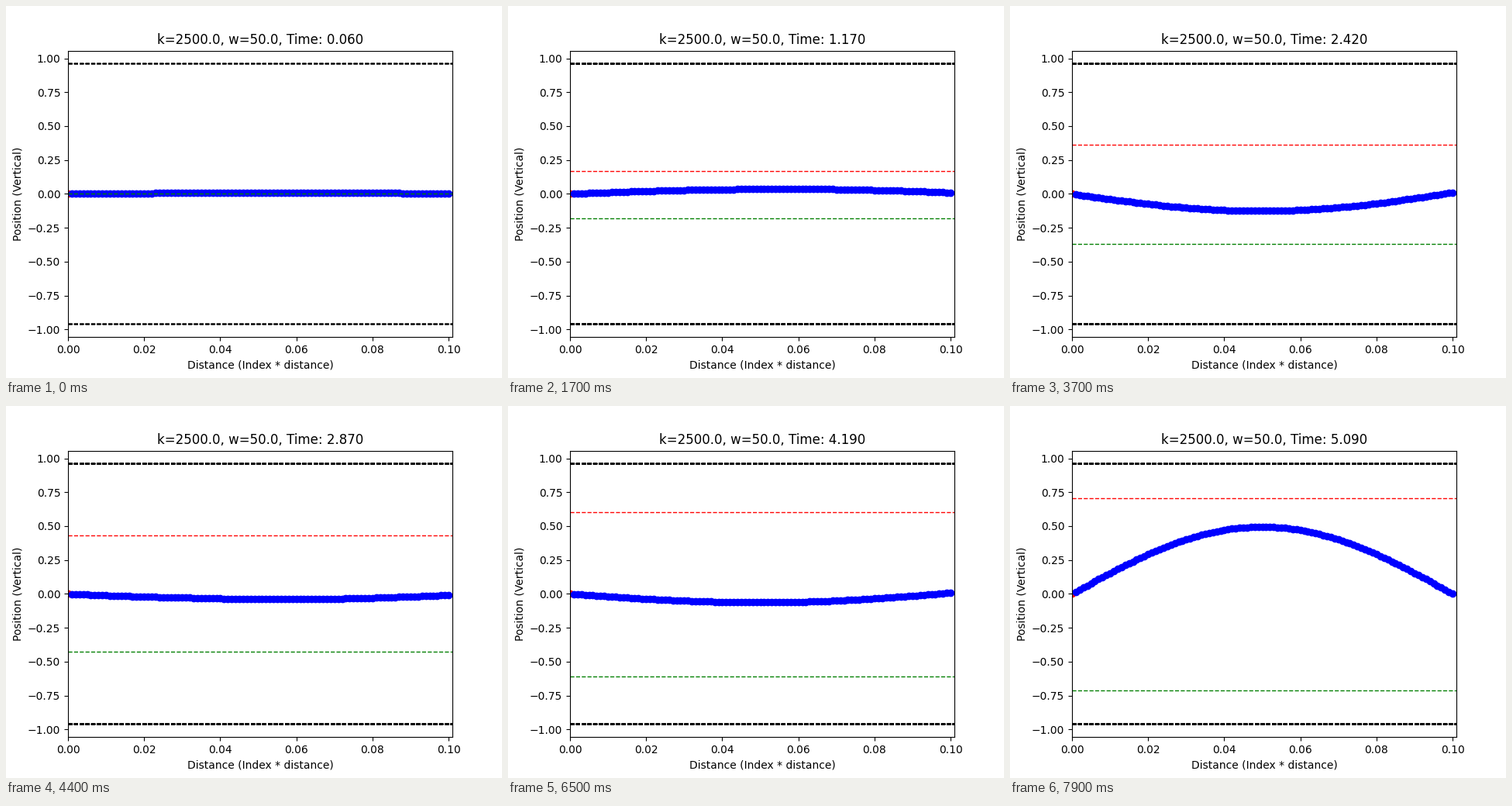
These frames come from a looping animation (640 by 480 pixels, 8 s). A matplotlib script:

```python
import numpy as np
import matplotlib.pyplot as plt
from matplotlib.animation import FuncAnimation

FRAMES, INTERVAL = 80, 100

# Chain of masses on springs, fixed at the left, driven at the right.
N, GAP = 100, 0.001
K, MASS = 2500.0, 0.001
W, DRIVE = 50.0, 0.01
PEAK = 0.961
STACK = 24

j = np.arange(N + 1)
p = np.arange(1, N)
omega2 = K / MASS
wp = 2 * np.sqrt(omega2) * np.sin(p * np.pi / (2 * N))
gain = 2 / N * omega2 * DRIVE * np.sin((N - 1) * p * np.pi / N) / (wp**2 - W**2)
shapes = np.sin(np.outer(p, j) * np.pi / N)


def chain(t):
    """Heights of all masses at each time in t, starting from rest."""
    t = np.atleast_1d(t)[:, None]
    y = (gain * (np.sin(W * t) - W / wp * np.sin(wp * t))) @ shapes
    y[:, 0] = 0
    y[:, -1] = DRIVE * np.sin(W * t[:, 0])
    return y


# Clock of the simulation, in hundredths of a second, for each frame.
steps = np.rint(np.interp(np.arange(FRAMES),
                          [0, 17, 29, 44, 53, 65, 79],
                          [6, 117, 191, 287, 345, 419, 509])).astype(int)
heights = chain(steps / 100)

fine = chain(np.arange(steps[-1] * 10 + 1) / 1000)
highest = np.maximum.accumulate(fine.max(axis=1))
lowest = np.minimum.accumulate(fine.min(axis=1))

fig, ax = plt.subplots(figsize=(6.4, 4.8), dpi=100)
ax.set_xlim(0, (N + 1) * GAP)
ax.set_ylim(-1.1 * PEAK, 1.1 * PEAK)
ax.set_xlabel("Distance (Index * distance)")
ax.set_ylabel("Position (Vertical)")
title = ax.set_title("")


def level(y, color):
    return ax.axhline(y, color=color, linestyle="--", linewidth=1)


# The limit lines are laid over each other again at every step.
limits = [(level(PEAK, "k"), level(-PEAK, "k")) for _ in range(STACK)]
top = level(0, "r")
ax.plot([0], [0], "ro")
masses, = ax.plot(j[1:] * GAP, np.zeros(N), "bo")
bottom = level(0, "g")


def update(i):
    n = steps[i]
    masses.set_ydata(heights[i, 1:])
    top.set_ydata([highest[n * 10]] * 2)
    bottom.set_ydata([lowest[n * 10]] * 2)
    for k, pair in enumerate(limits):
        for line in pair:
            line.set_visible(k < n)
    title.set_text(f"k={K}, w={W}, Time: {n / 100:.3f}")
    return masses, top, bottom, title


anim = FuncAnimation(fig, update, frames=FRAMES, interval=INTERVAL,
                     repeat=True, repeat_delay=0, blit=False)
plt.show()
```
